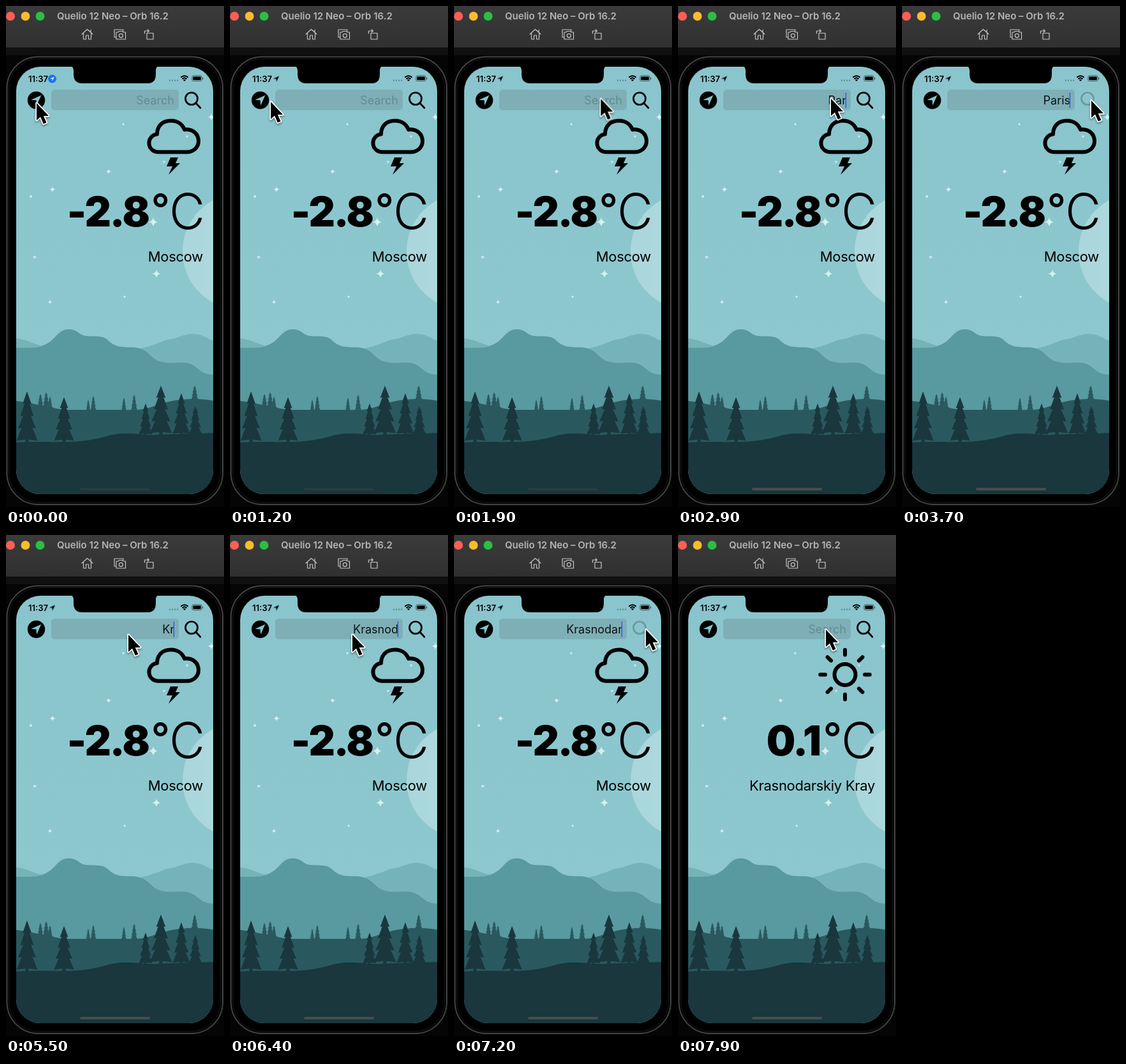
An HTML page for the animation above (8 s loop, 342 px wide and 784 px high).

```html
<!DOCTYPE html>
<html lang="en">
<head>
<meta charset="utf-8">
<title>Weather app demo</title>
<style>
  html, body { margin: 0; width: 100%; height: 100%; overflow: hidden; background: #050505; }
  svg { display: block; width: 342px; height: 784px; }
  text { font-family: Inter, Roboto, sans-serif; }
  .end { text-anchor: end; }
  .title { font-size: 15px; font-weight: 600; fill: #b5b5b6; }
  .clock { font-size: 13px; font-weight: 600; }
  .field { font-size: 18px; fill: #0b1315; }
  .field.hint { fill: #638b92; }
  .temp { font-size: 64px; font-weight: 900; letter-spacing: -2px; }
  .degree { font-size: 65px; font-weight: 500; }
  .unit { font-size: 77px; font-weight: 300; }
  .city { font-size: 22px; letter-spacing: -.3px; }
  .line { fill: none; stroke: #000; stroke-linecap: round; stroke-linejoin: round; }
  .tool { fill: none; stroke: #c4c4c5; stroke-width: 1.2; stroke-linejoin: round; stroke-linecap: round; }

  .moscow, .paris, .kray, .active, .idle, .bar { animation: 8s step-end infinite; }
  .moscow { animation-name: moscow; }
  .paris { animation-name: paris; }
  .kray { animation-name: kray; }
  .active { animation-name: active; }
  .idle { animation-name: idle; }
  .bar { animation-name: bar; }
  .locate { animation: locate 8s linear infinite; }
  .find { animation: find 8s linear infinite; }
  .cursor { animation: cursor 8s ease-in-out infinite; filter: drop-shadow(0 2px 1.5px #0006); }

  @keyframes moscow { 0%, 61.25% { opacity: 1 } 48.75%, 93.75%, 100% { opacity: 0 } }
  @keyframes paris { 0%, 61.25%, 100% { opacity: 0 } 48.75% { opacity: 1 } }
  @keyframes kray { 0% { opacity: 0 } 93.75%, 100% { opacity: 1 } }
  @keyframes active { 0%, 58.75% { opacity: 1 } 11.25%, 67.5%, 100% { opacity: 0 } }
  @keyframes idle { 0%, 58.75% { opacity: 0 } 11.25%, 67.5%, 100% { opacity: 1 } }
  @keyframes bar { 0% { fill: #2b3b42 } 25%, 100% { fill: #4a4b4e } }
  @keyframes locate { 0%, 53.75%, 58.75%, 100% { opacity: 1 } 55%, 56.25% { opacity: .87 } }
  @keyframes find {
    0%, 45%, 50%, 88.7%, 93.75%, 100% { opacity: 1 }
    46.25%, 47.5%, 89.9%, 91.25% { opacity: .22 }
  }
  @keyframes cursor {
    0%, 10% { transform: translate(48px, 152px) }
    15%, 17.5% { transform: translate(64px, 150px) }
    25%, 41.25% { transform: translate(240px, 145px) }
    45%, 48.75% { transform: translate(297px, 148px) }
    53.75%, 58.75% { transform: translate(51px, 150px) }
    65%, 83.75% { transform: translate(192px, 156px) }
    88.75%, 93.75% { transform: translate(301px, 148px) }
    98.75%, 100% { transform: translate(232px, 148px) }
  }
</style>
</head>
<body>
<svg viewBox="0 0 342 784">
  <defs>
    <linearGradient id="sky" x2="0" y2="1">
      <stop stop-color="#8ac4cc"/><stop offset="1" stop-color="#90cad0"/>
    </linearGradient>
    <linearGradient id="chrome" x2="0" y2="1">
      <stop stop-color="#3b3b3c"/><stop offset="1" stop-color="#303031"/>
    </linearGradient>
    <linearGradient id="moon">
      <stop stop-color="#a9d6db"/><stop offset="1" stop-color="#b9dfe2"/>
    </linearGradient>
    <clipPath id="screen"><rect x="16" y="95" width="309" height="669" rx="38"/></clipPath>
    <path id="tree" d="M0 0L8 24 4.500 23 12 47 7 46 16 70 10 69 19 93 3 91V101H-3V91L-19 93-10 69-16 70-7 46-12 47-4.500 23-8 24Z"/>
    <path id="star" d="M0-6Q.8-.8 6 0 .8.8 0 6-.8.8-6 0-.8-.8 0-6Z"/>
    <path id="plane" d="M7-7L-7.500-.5 0 0 .5 7.500Z"/>
    <path id="cloud" class="line" d="M240 228.500A14 14 0 0 1 237 200.500C237 187 246 179.500 259 179.500 270 179.500 277 186 280 193.500 293 192 302 200 302 211.500 302 221 294 228.500 284 228.500Z"/>
  </defs>

  <rect width="342" height="784" fill="#050505"/>
  <rect width="342" height="65" fill="url(#chrome)"/>
  <rect y="65" width="342" height="12" fill="#101010"/>
  <circle cx="7" cy="16" r="7" fill="#fe5f57"/>
  <circle cx="30.500" cy="16" r="7" fill="#febb2e"/>
  <circle cx="53.500" cy="16" r="7" fill="#28c03e"/>
  <text class="title" x="80" y="21">Quelio 12 Neo – Orb 16.2</text>
  <g class="tool">
    <path d="M119 44L127.500 36.500 136 44M121.500 42V52H125.500V46H129.500V52H133.500V42M133 41V37"/>
    <path d="M172.500 49H170V37H184V39M173 41H176L177.500 39.500H182.500L184 41H187.500V52H173Z"/>
    <circle cx="180.300" cy="46.300" r="3"/>
    <path d="M221 42.500H231V52H221ZM217.500 43V39H224M222 37L224.500 39 222 41"/>
  </g>

  <rect x="1.500" y="79.500" width="338.500" height="700.500" rx="49" fill="#000" stroke="#444445" stroke-width="2"/>
  <rect x="4.500" y="82.500" width="332" height="694.500" rx="46" fill="none" stroke="#1c1c1d"/>

  <g clip-path="url(#screen)">
    <rect x="15" y="95" width="311" height="670" fill="url(#sky)"/>
    <circle cx="367.700" cy="384" r="90.700" fill="url(#moon)"/>
    <g id="stars" fill="#d8eff1"></g>
    <path fill="#75b3ba" d="M15 520C34 522 40 528 56 532L90 560H200L210 536C232 532 242 525 254 522 270 520 276 514 292 513 308 513 314 520 326 524V620H15Z"/>
    <path fill="#5999a0" d="M15 535C30 535 45 536 56 532 78 525 80 506 98 506 114 506 114 516 128 516.500 144 517 154 516 161 524 170 533 180 534 198 534 222 535 224 548 238 555 256 562 272 556 286 559 303 564 304 577 326 577V690H15Z"/>
    <g fill="#29595f">
      <path d="M15 618C36 620 54 626 72 628 88 633 100 632 118 632H200C222 632 236 624 252 620 272 615 304 613 326 618V700H15Z"/>
      <g id="backTrees"></g>
    </g>
    <g fill="#19373d">
      <path d="M15 683C50 681 76 683 104 682 148 680 160 669 186 669 212 669 216 672 240 671 286 669 310 669 326 668V765H15Z"/>
      <g id="frontTrees"></g>
    </g>
    <rect class="bar" x="116" y="754" width="110" height="4" rx="2"/>
  </g>
  <path d="M99 94C105 94.500 106 97 106 102V107Q106 121 120 121H222Q235 121 235 107V102C235 97 236 94.500 242 94Z"/>

  <text class="clock" x="35" y="118.500">11:37</text>
  <g transform="translate(72.500 114)">
    <use class="idle" href="#plane" transform="scale(.64)"/>
    <g class="active">
      <circle r="6.500" fill="#1473f5"/>
      <use href="#plane" transform="scale(.46)" fill="#fff"/>
    </g>
  </g>
  <path d="M256 116.500H270" stroke="#55838a" stroke-width="2" stroke-dasharray="2 2"/>
  <g fill="none" stroke="#000" stroke-width="1.900">
    <path d="M274.300 111.800Q280 106.700 285.700 111.800M276.500 114.200Q280 111 283.500 114.200"/>
    <rect x="291.800" y="109" width="15.500" height="8.500" rx="2.500" stroke="#3c5a5f" stroke-width="1"/>
  </g>
  <path d="M277.800 115.500Q280 113.800 282.200 115.500L280 118Z"/>
  <rect x="293.300" y="110.500" width="12.500" height="5.500" rx="1.300"/>
  <path d="M308.800 112V115" stroke="#3c5a5f"/>

  <g class="locate">
    <circle cx="47.500" cy="147.500" r="13.700"/>
    <use href="#plane" transform="translate(47.500 147.500) scale(1.100)" fill="#8ac4cc"/>
  </g>
  <rect x="71" y="131" width="200" height="32" rx="5" fill="#7eafb6"/>
  <text id="field" class="field end hint" x="264" y="154">Search</text>
  <rect id="caret" x="262.500" y="135.500" width="1.700" height="24" fill="#3a62d8" opacity="0"/>
  <path class="line find" stroke-width="2.700" d="M281.500 145a9.500 9.500 0 1 0 19 0a9.500 9.500 0 1 0-19 0M298 152L305 159.500"/>

  <text class="degree" x="227.500" y="341">°</text>
  <text class="unit end" x="312" y="349">C</text>
  <g class="moscow">
    <use href="#cloud" stroke-width="6"/>
    <path d="M258 237H270L266 246H273L255 264 261 251H252Z"/>
    <text class="temp end" x="224" y="345">-2.8</text>
    <text class="city end" x="309" y="400">Moscow</text>
  </g>
  <g class="paris">
    <use href="#cloud" transform="translate(-12.700 -7.600) scale(1.048 1.040)" stroke-width="5.600"/>
    <path class="line" stroke-width="4.800" d="M239.500 245H289M239.500 258.500H289"/>
    <text class="temp end" x="224" y="345">-0.5</text>
    <text class="city end" x="309" y="400">Paris</text>
  </g>
  <g class="kray">
    <g class="line" stroke-width="6" transform="translate(262 218.500)">
      <circle r="16.500"/>
      <path id="rays"/>
    </g>
    <text class="temp end" x="223" y="345">0.1</text>
    <text class="city end" x="309" y="400">Krasnodarskiy Kray</text>
  </g>

  <path class="cursor" d="M0 0V27L6 21.500 10.800 32.500 15.500 30.500 10.800 20H19Z" stroke="#fff" stroke-width="3.400" paint-order="stroke" stroke-linejoin="round"/>
</svg>
<script>
  const $ = id => document.getElementById(id);
  const place = (shape, x, y, sx, sy = sx) =>
    `<use href="#${shape}" transform="translate(${x} ${y}) scale(${sx} ${sy})"/>`;
  const tree = ([x, top, base, w]) => place('tree', x, top, w / 38, (base - top) / 100);

  $('stars').innerHTML = [
    [322, 174, .9], [184, 185, .4], [161, 259, .7], [73, 287, .8], [39, 298, .5], [231, 338, 1.2],
    [45, 393, .5], [236, 419, 1.1], [69, 463, .6], [186, 455, .4], [284, 204, .4], [248, 244, .4]
  ].map(([x, y, s]) => place('star', x, y, s)).join('');

  $('backTrees').innerHTML = [
    [54, 607, 629, 10], [63, 604, 630, 11], [69, 611, 630, 8], [129, 616, 634, 7], [137, 610, 634, 9],
    [185, 613, 634, 8], [201, 608, 634, 10], [296, 594, 617, 11]
  ].map(tree).join('');

  $('frontTrees').innerHTML = [
    [33, 603, 686, 33], [91, 612, 685, 31], [219, 622, 674, 21],
    [243, 594, 674, 35], [275, 606, 674, 27], [297, 626, 674, 21]
  ].map(tree).join('');

  $('rays').setAttribute('d', Array.from({ length: 8 }, (_, i) => {
    const a = i * Math.PI / 4, x = Math.cos(a), y = Math.sin(a);
    return `M${31 * x} ${31 * y}L${38.8 * x} ${38.8 * y}`;
  }).join(''));

  // Focus time, first key, key interval and submit time in ms.
  const entries = [
    { word: 'Paris', focus: 2100, first: 2600, gap: 140, submit: 3850 },
    { word: 'Krasnodar', focus: 5200, first: 5300, gap: 170, submit: 7450 }
  ];
  let start;

  function draw(now) {
    start ??= now;
    const t = (now - start) % 8000;
    const entry = entries.find(e => t >= e.focus && t < e.submit);
    const count = entry ? Math.max(0, Math.floor((t - entry.first) / entry.gap) + 1) : 0;
    const typed = entry ? entry.word.slice(0, count) : '';
    $('field').textContent = typed || 'Search';
    $('field').classList.toggle('hint', !typed);
    $('caret').setAttribute('opacity', entry ? 1 : 0);
    requestAnimationFrame(draw);
  }
  requestAnimationFrame(draw);
</script>
</body>
</html>
```
